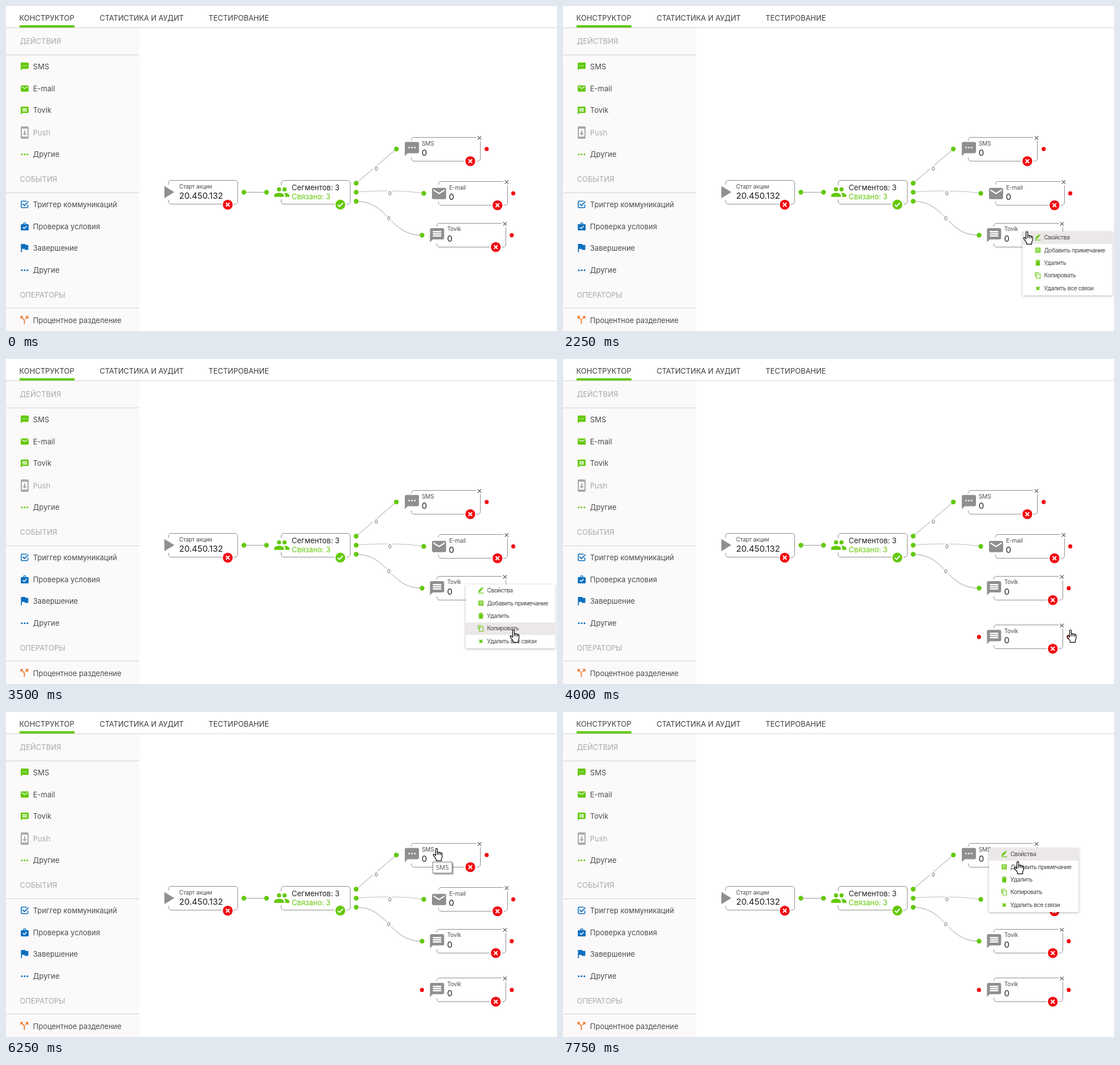
An HTML page for the animation above (8 s loop, 974 by 575 pixels).

```html
<!DOCTYPE html>
<html lang="ru">
<head>
<meta charset="utf-8">
<title>Конструктор</title>
<style>
  html, body { margin: 0; width: 100%; height: 100%; overflow: hidden; background: #fff; }
  svg { display: block; }
  text { font-family: Inter, "Open Sans", sans-serif; font-size: 13px; fill: #3c3c3c; }
  .side text { fill: #4c4c4c; }
  .side .head { fill: #a9a9a9; }
  .small { font-size: 10px; letter-spacing: -.15px; fill: #4a4a4a; }
  .num { font-size: 15px; fill: #1c1c1c; }
  .count { font-size: 9px; fill: #555; text-anchor: middle; }
  .item { font-size: 10.5px; letter-spacing: -.45px; fill: #444; }
  .panel { fill: #fff; filter: drop-shadow(0 1px 2px rgba(0, 0, 0, .3)); }
  .tip rect { fill: #fff; stroke: #777; filter: drop-shadow(2px 2px 1px rgba(0, 0, 0, .35)); }
  .tip text { font: 11.5px "Open Sans", "Noto Sans", sans-serif; fill: #555; }
  .green { fill: #64c80a; }
  .blue { fill: #0b6fbe; }
  .orange { fill: #ee7426; }
  .red { fill: #f20a12; }
  .gray { fill: #8f8f8f; }
  .pale { fill: #a9a9a9; }
  .white { fill: #fff; }
  .rule { stroke: #d2d2d2; }
  .frame { fill: #fff; stroke: #8d8d8d; }
  .link { fill: none; stroke: #9c9c9c; }
  .cross { fill: none; stroke: #555; stroke-width: 1.2; }
  .mark { fill: none; stroke: #fff; stroke-width: 2; }
  path { fill-rule: evenodd; }

  .anim { animation: 8s step-end infinite; }
  #cursor { animation-name: move; }
  #arrow { animation-name: arrow; }
  #hand { animation-name: hand; }
  #tipA { animation-name: tipA; }
  #tipB { animation-name: tipB; }
  #menuA { animation-name: menuA; }
  #menuB { animation-name: menuB; }
  #rowA { animation-name: rowA; }
  #rowB { animation-name: rowB; }
  #copy { animation-name: copy; }
  #copyDots { animation-name: copyDots; }
  #hotCross { animation-name: hotCross; }

  @keyframes move {
    0% { transform: translate(-60px, 600px); }
    3.125% { transform: translate(669px, 569px); }
    6.25% { transform: translate(687px, 558px); }
    9.375% { transform: translate(821px, 476px); }
    12.5% { transform: translate(834px, 430px); }
    15.625% { transform: translate(820px, 399px); }
    37.5% { transform: translate(850px, 442px); }
    40.625% { transform: translate(878px, 462px); }
    43.75% { transform: translate(897px, 479px); }
    62.5% { transform: translate(889px, 468px); }
    65.625% { transform: translate(761px, 263px); }
    68.75% { transform: translate(761px, 241px); }
    96.875%, 100% { transform: translate(804px, 264px); }
  }
  @keyframes arrow { 0% { opacity: 1; } 12.5%, 100% { opacity: 0; } }
  @keyframes hand { 0% { opacity: 0; } 12.5%, 100% { opacity: 1; } }
  @keyframes tipA { 0% { opacity: 0; } 25% { opacity: 1; } 28.125%, 100% { opacity: 0; } }
  @keyframes tipB { 0% { opacity: 0; } 75% { opacity: .7; } 78.125% { opacity: 1; } 84.375%, 100% { opacity: 0; } }
  @keyframes menuA { 0% { opacity: 0; } 28.125% { opacity: 1; } 46.875%, 100% { opacity: 0; } }
  @keyframes menuB { 0% { opacity: 0; } 84.375%, 100% { opacity: 1; } }
  @keyframes rowA {
    0% { transform: translateY(0); }
    37.5% { transform: translateY(22.4px); }
    40.625% { transform: translateY(44.8px); }
    43.75%, 100% { transform: translateY(67.2px); }
  }
  @keyframes rowB { 0% { opacity: 0; } 87.5%, 100% { opacity: 1; } }
  @keyframes copy { 0% { opacity: 0; } 46.875%, 100% { opacity: 1; } }
  @keyframes copyDots { 0% { opacity: 0; } 50%, 100% { opacity: 1; } }
  @keyframes hotCross { 0% { opacity: 0; } 62.5% { opacity: 1; } 65.625%, 100% { opacity: 0; } }
</style>
</head>
<body>
<svg width="974" height="575" viewBox="0 0 974 575">
  <defs>
    <!-- icons are centred on 0,0 -->
    <path id="sms" transform="translate(-12 -12)" d="M20 2H4c-1.1 0-2 .9-2 2v18l4-4h14c1.1 0 2-.9 2-2V4c0-1.1-.9-2-2-2zM9 11H7V9h2zm4 0h-2V9h2zm4 0h-2V9h2z"/>
    <path id="mail" transform="translate(-12 -12)" d="M20 4H4c-1.1 0-2 .9-2 2v12c0 1.1.9 2 2 2h16c1.1 0 2-.9 2-2V6c0-1.1-.9-2-2-2zm0 4l-8 5-8-5V6l8 5 8-5z"/>
    <path id="chat" transform="translate(-12 -12)" d="M20 2H4c-1.1 0-2 .9-2 2v18l4-4h14c1.1 0 2-.9 2-2V4c0-1.1-.9-2-2-2zm-2 12H6v-2h12zm0-3H6V9h12zm0-3H6V6h12z"/>
    <path id="phone" transform="translate(-12 -12)" d="M17 1H7c-1.1 0-2 .9-2 2v18c0 1.1.9 2 2 2h10c1.1 0 2-.9 2-2V3c0-1.1-.9-2-2-2zm0 18H7V5h10zm-1-6h-3V8h-2v5H8l4 4z"/>
    <path id="people" transform="translate(-12 -12)" d="M16 11a3 3 0 1 0 0-6 3 3 0 0 0 0 6zM8 11a3 3 0 1 0 0-6 3 3 0 0 0 0 6zM8 13c-2.33 0-7 1.17-7 3.5V19h14v-2.5C15 14.17 10.33 13 8 13zM16 13l-.97.05c1.16.84 1.97 1.97 1.97 3.45V19h6v-2.5c0-2.33-4.67-3.5-7-3.5z"/>
    <path id="flag" transform="translate(-12 -12)" d="M14.4 6L14 4H5v17h2v-7h5.6l.4 2h7V6z"/>
    <path id="split" transform="translate(-12 -12)" d="M14 4l2.29 2.29-2.88 2.88 1.42 1.42 2.88-2.88L20 10V4zm-4 0H4v6l2.29-2.29 4.71 4.7V20h2v-8.41l-5.29-5.3z"/>
    <g id="more"><circle cx="-5" r="1.6"/><circle r="1.6"/><circle cx="5" r="1.6"/></g>
    <path id="x" d="M-3.2-3.2L3.2 3.2M3.2-3.2L-3.2 3.2"/>
    <g id="bad">
      <circle r="11" class="white"/><circle r="8.7" class="red"/>
      <use href="#x" class="mark"/>
    </g>
    <g id="good">
      <circle r="11" class="white"/><circle r="8.7" class="green"/>
      <path class="mark" d="M-4.5.3L-1.5 3.3L4.5-3"/>
    </g>
    <rect id="frame" class="frame" x=".5" y=".5" width="122" height="42" rx="4.5"/>
    <g id="card">
      <use href="#frame"/>
      <rect class="white" x="-13" y="6" width="28" height="30"/>
      <circle class="white" cx="121" cy="1.5" r="6"/>
      <use href="#x" class="cross" x="121" y="1.5"/>
      <use href="#bad" x="104.8" y="42.5"/>
      <text class="num" x="18.8" y="32.5">0</text>
    </g>
    <circle id="dot" r="4.2"/>
    <ellipse id="end" rx="3.6" ry="3.8"/>
    <g id="items">
      <g class="green">
        <path d="M22.5 13.5v-2.3l5.4-5.4 2.2 2.2-5.4 5.5zM28.6 5.2l1-1 2.2 2.2-1 1zM22 14.5h10v1.2H22z"/>
        <path d="M22.5 28.5h9v9h-9zM24 30.3v.9h6v-.9zm0 2.2v.9h6v-.9zm0 2.2v.9h6v-.9z"/>
        <path d="M23 51h8v1.4h-8zM25.5 50h3v1h-3zM23.4 53h7.2v6.6q0 1-1 1h-5.2q-1 0-1-1z"/>
      </g>
      <g fill="none" stroke="#64c80a">
        <path d="M22.5 80v-7.5H29M24.5 75h6.5v8h-6.5z" stroke-width="1.2"/>
        <path d="M24.3 97.8l5.4 5.4M29.7 97.8l-5.4 5.4" stroke-width="2.4"/>
      </g>
      <text class="item" x="37.7" y="14.2">Свойства</text>
      <text class="item" x="37.7" y="36.6">Добавить примечание</text>
      <text class="item" x="37.7" y="59">Удалить</text>
      <text class="item" x="37.7" y="81.4">Копировать</text>
      <text class="item" x="37.7" y="103.8">Удалить все связи</text>
    </g>
    <rect id="panel" class="panel" width="158.5" height="113"/>
    <rect id="row" width="158.5" height="22" fill="#ece8e8"/>
  </defs>

  <rect width="974" height="575" class="white"/>

  <!-- sidebar and tabs -->
  <rect y="39" width="235.5" height="536" fill="#fbf9fa"/>
  <path class="rule" d="M0 38.5H974M0 86.5H235.5M0 330.5H235.5M0 534.5H235.5"/>
  <rect class="green" x="24" y="34" width="97" height="4"/>
  <text x="23.5" y="25.7">КОНСТРУКТОР</text>
  <text x="165.5" y="25.7" letter-spacing="-.1">СТАТИСТИКА И АУДИТ</text>
  <text x="358" y="25.7">ТЕСТИРОВАНИЕ</text>

  <g class="side">
    <text class="head" x="24.5" y="67.3">ДЕЙСТВИЯ</text>
    <text class="head" x="24.5" y="311.2">СОБЫТИЯ</text>
    <text class="head" x="24.5" y="515.7">ОПЕРАТОРЫ</text>
    <g class="green">
      <use href="#sms" transform="translate(33 107) scale(.7)"/>
      <use href="#mail" transform="translate(33 146) scale(.7)"/>
      <use href="#chat" transform="translate(33 185) scale(.7)"/>
      <use href="#more" x="33" y="262.5"/>
    </g>
    <use href="#phone" class="pale" x="33" y="224"/>
    <g class="blue">
      <path d="M36.5 345.2H28q-1 0-1 1v9.6q0 1 1 1h9.6q1 0 1-1v-4.6" fill="none" stroke="#0b6fbe" stroke-width="1.6"/>
      <path d="M29.3 349.8l3.3 3.4 7-7.4" fill="none" stroke="#0b6fbe" stroke-width="1.7"/>
      <path d="M27.5 386h2.8v-1.2q0-1.8 1.8-1.8h2q1.8 0 1.8 1.8v1.2h2.8q1.3 0 1.3 1.3v8.4q0 1.3-1.3 1.3h-11.2q-1.3 0-1.3-1.3v-8.4q0-1.3 1.3-1.3zM31.6 386h3v-1.6h-3z"/>
      <path class="mark" style="stroke-width:1.5" d="M29.8 391.3l2.4 2.4 4.4-4.4"/>
      <use href="#flag" transform="translate(32.5 428) scale(.87)"/>
      <use href="#more" x="33" y="467.5"/>
    </g>
    <use href="#split" class="orange" transform="translate(32.5 555.5) scale(.87)"/>
    <text x="47.8" y="111.5">SMS</text>
    <text x="47.8" y="150.5">E-mail</text>
    <text x="47.8" y="189">Tovik</text>
    <text x="47.8" y="228.5" style="fill:#a9a9a9">Push</text>
    <text x="47.8" y="267">Другие</text>
    <text x="47.8" y="355.5">Триггер коммуникаций</text>
    <text x="47.8" y="394.5">Проверка условия</text>
    <text x="47.8" y="433">Завершение</text>
    <text x="47.8" y="472.3">Другие</text>
    <text x="47.8" y="560.5">Процентное разделение</text>
  </g>

  <!-- links -->
  <path class="link" d="M420.5 329.5H460.5M619 313.5L690 253M619 345.5C677 345.5 677 405.5 735 405.5"/>
  <path class="link" style="stroke:#bdbdbd" d="M619 329.5C640 327 700 325 738 331.5"/>
  <g class="white">
    <circle cx="654.5" cy="287.5" r="6"/><circle cx="678.5" cy="332" r="6"/><circle cx="676.5" cy="376" r="6"/>
  </g>
  <text class="count" x="654.5" y="291">0</text>
  <text class="count" x="678.5" y="335.2">0</text>
  <text class="count" x="676.5" y="379.3">0</text>
  <g class="green">
    <use href="#dot" x="420.5" y="329.5"/><use href="#dot" x="460.5" y="329.5"/>
    <use href="#dot" x="619" y="313.5"/><use href="#dot" x="619" y="329.5"/><use href="#dot" x="619" y="345.5"/>
    <use href="#dot" x="690" y="253"/><use href="#dot" x="738.5" y="331.5"/><use href="#dot" x="735.5" y="405.5"/>
  </g>
  <g class="red">
    <use href="#end" x="849.7" y="253"/><use href="#end" x="896.7" y="331.5"/><use href="#end" x="894" y="405.5"/>
  </g>

  <!-- nodes -->
  <use href="#frame" x="287" y="308"/>
  <rect class="white" x="279" y="316" width="19" height="27"/>
  <path class="gray" d="M280 318.5L297.5 329.2L280 340z"/>
  <use href="#bad" x="392" y="351.5"/>
  <text class="small" x="306" y="322.7">Старт акции</text>
  <text class="num" x="306" y="341.3">20.450.132</text>

  <use href="#frame" x="486" y="308"/>
  <rect class="white" x="474" y="317" width="28" height="25"/>
  <use href="#people" class="green" transform="translate(487.5 329.3) scale(1.22)"/>
  <use href="#good" x="591" y="351.3"/>
  <text x="505" y="325.7" style="fill:#222">Сегментов: 3</text>
  <text x="505" y="342" style="fill:#64c80a">Связано: 3</text>

  <use href="#card" x="716" y="232"/>
  <use href="#sms" class="gray" transform="translate(717.5 253) scale(1.25)"/>
  <text class="small" x="735" y="246.8">SMS</text>

  <use href="#card" x="764" y="310"/>
  <use href="#mail" class="gray" transform="translate(765.5 331.8) scale(1.25)"/>
  <text class="small" x="783.5" y="325.3">E-mail</text>

  <use href="#card" x="761" y="384"/>
  <use href="#chat" class="gray" transform="translate(762 405.5) scale(1.25)"/>
  <text class="small" x="780" y="398.3">Tovik</text>

  <g id="copy" class="anim">
    <use href="#card" x="761" y="470"/>
    <use href="#chat" class="gray" transform="translate(762 491.8) scale(1.25)"/>
    <text class="small" x="780" y="484.6">Tovik</text>
    <use id="hotCross" class="anim cross" style="stroke:#f20a12" href="#x" x="882" y="471.5"/>
  </g>
  <g id="copyDots" class="anim red">
    <use href="#end" x="735.3" y="491.8"/><use href="#end" x="894" y="491.8"/>
  </g>

  <!-- context menus -->
  <g transform="translate(812.5 399)">
    <g id="menuA" class="anim">
      <use href="#panel"/><use href="#row" id="rowA" class="anim"/><use href="#items"/>
    </g>
  </g>
  <g transform="translate(753 241)">
    <g id="menuB" class="anim">
      <use href="#panel"/><use href="#row" id="rowB" class="anim"/><use href="#items"/>
    </g>
  </g>

  <!-- tooltips -->
  <g id="tipA" class="anim tip">
    <rect x="813.5" y="423.5" width="41" height="20"/><text x="819" y="437.5">Tovik</text>
  </g>
  <g id="tipB" class="anim tip">
    <rect x="754.5" y="265.5" width="34" height="19.5"/><text x="759.8" y="279.2">SMS</text>
  </g>

  <g id="cursor" class="anim" fill="#fff" stroke="#000">
    <path id="arrow" class="anim" d="M.5.5V16l3.5-3.4 2.4 5.4 2.2-1-2.4-5.3H11z"/>
    <g id="hand" class="anim">
      <g transform="translate(-6.5 -.3)" stroke-width="1.2" stroke-linejoin="round">
        <path d="M5 2C5 .2 8 .2 8 2V8C8 6.8 11 6.8 11 8.5C11 7.3 14 7.5 14 9.2C14 8.2 16.5 8.5 16.5 10.5V15C16.5 17 15 18 15 20V22.7H6V20.5C5 18 1.5 14.5.8 12.5C.3 10.8 2.3 10.3 3.3 11.5L5 13.5z"/>
        <path d="M8 8V12M11 8.5V12M14 9.2V12.5" fill="none"/>
      </g>
    </g>
  </g>
</svg>
</body>
</html>
```
